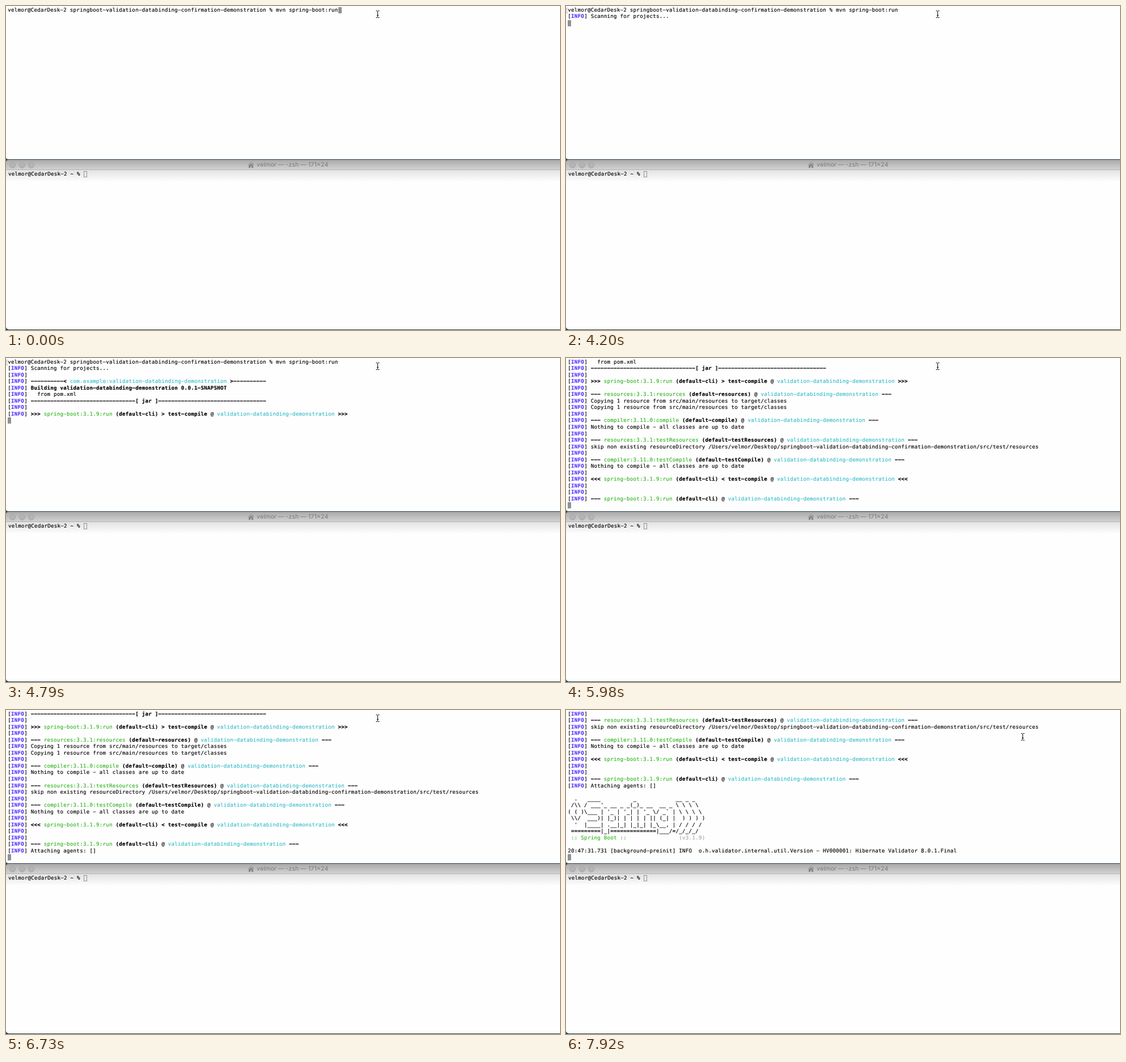
Write an HTML page that moves like this. It is 977x573 px and loops after 8 s.

```html
<!DOCTYPE html>
<html lang="en">
<head>
<meta charset="utf-8">
<title>Terminal</title>
<style>
html, body { margin: 0; width: 100%; height: 100%; overflow: hidden; }
body { position: relative; background: #28404a; text-rendering: geometricPrecision; }
body *:not(b, i, u, s) { position: absolute; box-sizing: border-box; margin: 0; }

#upper, #lower { left: 0; width: 977px; background: #fefefe; overflow: hidden; }
#upper { top: 0; height: 271px; border-bottom-left-radius: 4px; }
#lower { top: 272px; height: 300px; border-radius: 5px 0 0 5px; }

/* one character cell is 5.765 x 11.53 px */
.term {
  font: 9.2px/11.53px "DejaVu Sans Mono", monospace;
  letter-spacing: calc(5.765px - 1ch);
  -webkit-text-stroke: .15px;
  color: #000;
  white-space: pre;
}
.term i { font-style: normal; color: #2fb41d; }
.term u { text-decoration: none; color: #33bbc8; }
.term s { text-decoration: none; color: #a6a6a6; }
.term b.tag { color: #5833ff; }

#screen { left: 3.3px; top: 1.7px; }
#block { width: 6px; height: 11px; background: #919191; }
#mark { left: 1px; top: 3px; width: 2px; height: 10px; border: 1px solid #b4b4b4; border-right: 0; }

#bar { left: 0; top: 0; width: 100%; height: 18px; background: linear-gradient(#a9a9a9, #d2d2d2); border-bottom: 1px solid #b2b2b2; }
#shade { left: 0; top: 18px; width: 100%; height: 21px; background: linear-gradient(#0000001c, #0000); }
.light { top: 4px; width: 11px; height: 11px; border-radius: 50%; background: #b4b4b4; border: 1px solid #a2a2a2; }
#name { left: 442px; top: 2px; font: 500 10.7px/14px Inter, sans-serif; color: #858585; white-space: pre; }
#home { left: 426px; top: 3px; }
#prompt { left: 4px; top: 19.7px; }
#hollow { left: 137px; top: 20px; width: 6px; height: 11px; border: 1px solid #919191; }
#beam { left: 0; top: 0; }
</style>
</head>
<body>
<div id="upper">
  <pre id="screen" class="term"></pre>
  <div id="block"></div>
  <div id="mark"></div>
</div>
<div id="lower">
  <div id="bar">
    <div class="light" style="left:6px"></div>
    <div class="light" style="left:22.5px"></div>
    <div class="light" style="left:39px"></div>
    <svg id="home" width="12" height="12" fill="none" stroke="#858585">
      <path d="M.5 6.5 6 1.5l5.5 5M9.5 4V2"/>
      <path d="M2.5 7 6 4l3.5 3v4h-2V8h-3v3h-2z" fill="#858585"/>
    </svg>
    <div id="name">velmor — -zsh — 171×24</div>
  </div>
  <div id="shade"></div>
  <pre id="prompt" class="term"></pre>
  <div id="hollow"></div>
</div>
<svg id="beam" width="7" height="13" fill="none" stroke="#000">
  <path d="M.5 .5H2.5L3.5 1.5 4.5 .5H6.5M3.5 1.5v10M.5 12.5H2.5L3.5 11.5 4.5 12.5H6.5M2 8.5h3"/>
</svg>

<template id="log">velmor@CedarDesk-2 springboot-validation-databinding-confirmation-demonstration % mvn spring-boot:run
[INFO] Scanning for projects...
[INFO]
[INFO] <b>----------&lt; </b><u>com.example:validation-databinding-demonstration</u><b> >----------</b>
[INFO] <b>Building validation-databinding-demonstration 0.0.1-SNAPSHOT</b>
[INFO]   from pom.xml
[INFO] <b>--------------------------------[ jar ]---------------------------------</b>
[INFO]
[INFO] <b>>>></b> <i>spring-boot:3.1.9:run</i> <b>(default-cli) > test-compile</b> @ <u>validation-databinding-demonstration</u> <b>>>></b>
[INFO]
[INFO] <b>---</b> <i>resources:3.3.1:resources</i> <b>(default-resources)</b> @ <u>validation-databinding-demonstration</u> <b>---</b>
[INFO] Copying 1 resource from src/main/resources to target/classes
[INFO] Copying 1 resource from src/main/resources to target/classes
[INFO]
[INFO] <b>---</b> <i>compiler:3.11.0:compile</i> <b>(default-compile)</b> @ <u>validation-databinding-demonstration</u> <b>---</b>
[INFO] Nothing to compile - all classes are up to date
[INFO]
[INFO] <b>---</b> <i>resources:3.3.1:testResources</i> <b>(default-testResources)</b> @ <u>validation-databinding-demonstration</u> <b>---</b>
[INFO] skip non existing resourceDirectory /Users/velmor/Desktop/springboot-validation-databinding-confirmation-demonstration/src/test/resources
[INFO]
[INFO] <b>---</b> <i>compiler:3.11.0:testCompile</i> <b>(default-testCompile)</b> @ <u>validation-databinding-demonstration</u> <b>---</b>
[INFO] Nothing to compile - all classes are up to date
[INFO]
[INFO] <b>&lt;&lt;&lt;</b> <i>spring-boot:3.1.9:run</i> <b>(default-cli) &lt; test-compile</b> @ <u>validation-databinding-demonstration</u> <b>&lt;&lt;&lt;</b>
[INFO]
[INFO]
[INFO] <b>---</b> <i>spring-boot:3.1.9:run</i> <b>(default-cli)</b> @ <u>validation-databinding-demonstration</u> <b>---</b>
[INFO] Attaching agents: []

  .   ____          _            __ _ _
 /\\ / ___'_ __ _ _(_)_ __  __ _ \ \ \ \
( ( )\___ | '_ | '_| | '_ \/ _` | \ \ \ \
 \\/  ___)| |_)| | | | | || (_| |  ) ) ) )
  '  |____| .__|_| |_|_| |_\__, | / / / /
 =========|_|==============|___/=/_/_/_/
<i> :: Spring Boot ::</i>                <s>(v3.1.9)</s>

20:47:31.731 [background-preinit] INFO  o.h.validator.internal.util.Version - HV000001: Hibernate Validator 8.0.1.Final</template>

<script>
const LOOP = 8000, CELL_W = 5.765, CELL_H = 11.53, LAST_ROW = 22, PROMPT_COLS = 101;
const $ = id => document.getElementById(id);
// the terminal face has wide hyphens, so draw them as minus signs
const wideHyphens = text => text.replaceAll('-', '\u2212');
const lines = wideHyphens($('log').innerHTML)
  .replace(/^\[INFO\]/gm, '[<b class="tag">INFO</b>]')
  .split('\n');
$('prompt').textContent = wideHyphens('velmor@CedarDesk-2 ~ %');

// [start ms, row of the block cursor counted from the first line]
const output = [[0, 0], [1350, 1], [4200, 2], [4640, 7], [4790, 9], [5540, 11],
  [5840, 15], [5980, 27], [6730, 28], [7920, 38]];
// [start ms, pointer left, top]
const pointer = [[0, 652, 8], [7480, 702, 6], [7630, 765, 27], [7770, 802, 41]];

const at = (steps, t) => steps.findLast(step => step[0] <= t);
const place = (el, x, y) => el.style.transform = `translate(${x}px, ${y}px)`;
let drawn = -1;

function drawOutput(row) {
  if (row === drawn) return;
  drawn = row;
  const scroll = Math.max(0, row - LAST_ROW);
  $('screen').innerHTML = lines.slice(scroll, Math.max(row, 1)).join('\n');
  place($('block'), Math.round(3.3 + (row ? 0 : PROMPT_COLS * CELL_W)),
    Math.round(1.7 + (row - scroll) * CELL_H));
  $('mark').hidden = row === 0 || scroll > 0;
}

function frame() {
  const t = performance.now() % LOOP;
  drawOutput(at(output, t)[1]);
  const [, x, y] = at(pointer, t);
  place($('beam'), x, y);
  requestAnimationFrame(frame);
}
frame();
</script>
</body>
</html>
```
